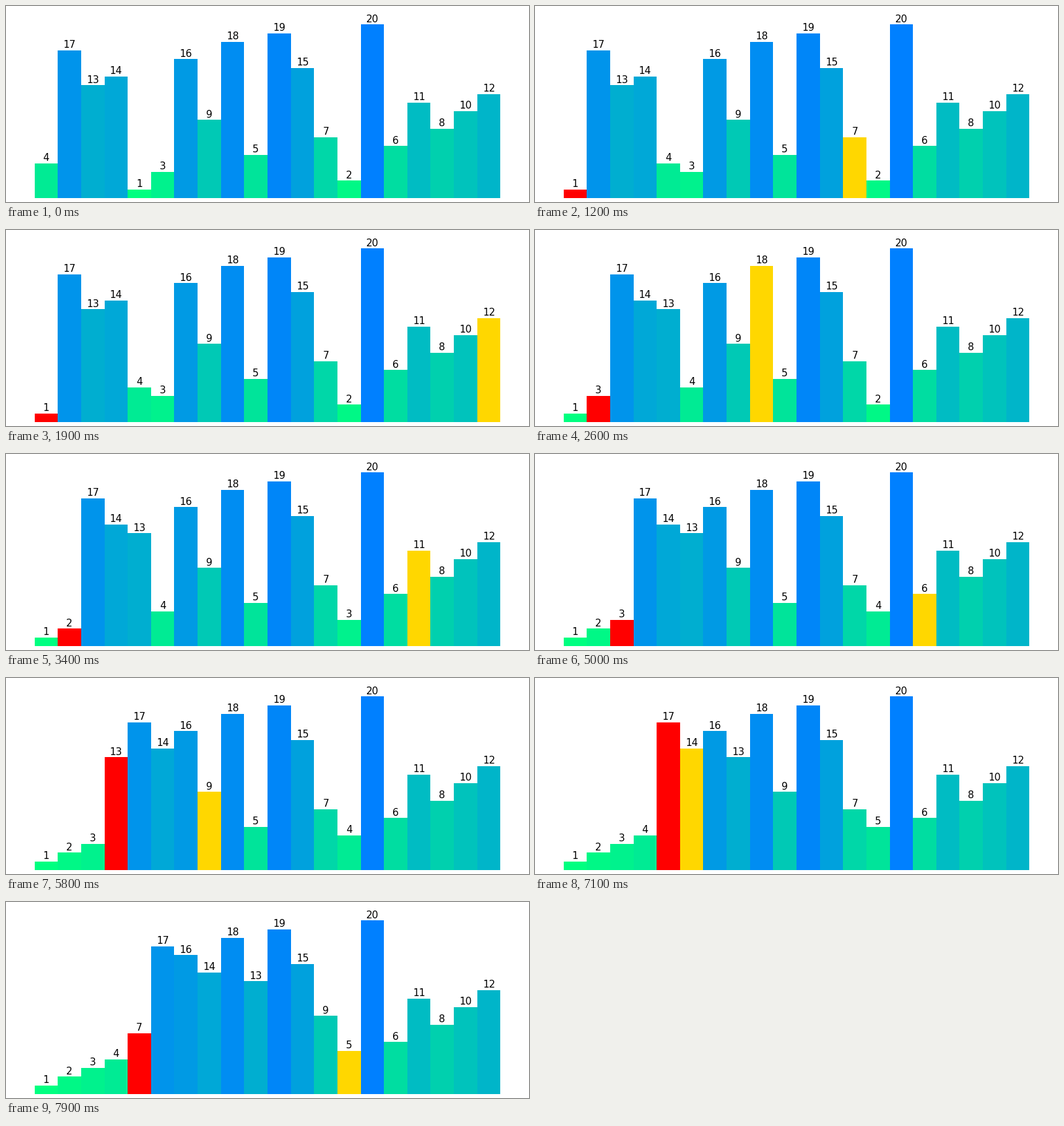
A matplotlib script that plays this animation: 800 by 300 pixels, repeating every 8000 ms.

```python
import matplotlib.pyplot as plt
from matplotlib.animation import FuncAnimation

VALUES = [4, 17, 13, 14, 1, 3, 16, 9, 18, 5, 19, 15, 7, 2, 20, 6, 11, 8, 10, 12]
N = len(VALUES)
FRAMES = 80
RED, GOLD = "#ff0000", "#ffd700"


def exchange_sort(values):
    """Yield (values, i, j) at the start and before every comparison."""
    a = list(values)
    yield a[:], None, None
    for i in range(N - 1):
        for j in range(i + 1, N):
            yield a[:], i, j
            if a[i] > a[j]:
                a[i], a[j] = a[j], a[i]


def shade(v):
    t = (v - 1) / (N - 1)
    return (0, 1 - t / 2, 0.5 + t / 2)


steps = [step for step, _ in zip(exchange_sort(VALUES), range(FRAMES))]

fig, ax = plt.subplots(figsize=(8, 3), dpi=100, facecolor="white")
fig.subplots_adjust(left=0.01, right=0.99, bottom=0.02, top=0.95)
ax.set_xlim(-1.5, N + 0.5)
ax.set_ylim(0, N * 1.05)
ax.axis("off")

bars = ax.bar(range(N), VALUES, width=1, linewidth=0)
for x, bar in enumerate(bars):
    bar.set_x(x - 0.5)
labels = [ax.text(x, v, str(v), ha="center", va="baseline",
                  fontsize=11, family="DejaVu Sans", color="black")
          for x, v in enumerate(VALUES)]
ax.set_xlim(-1.5, N + 0.5 - 0)
ax.set_xlim(-0.5 - N * 0.05, N - 0.5 + N * 0.05)


def update(frame):
    values, i, j = steps[frame]
    for k, (v, bar, label) in enumerate(zip(values, bars, labels)):
        bar.set_height(v)
        bar.set_facecolor(RED if k == i else GOLD if k == j else shade(v))
        label.set_text(str(v))
        label.set_y(v + 0.28)
    return [*bars, *labels]


anim = FuncAnimation(fig, update, frames=FRAMES, interval=100,
                     init_func=lambda: update(0), repeat=True, repeat_delay=0)
plt.show()
```
